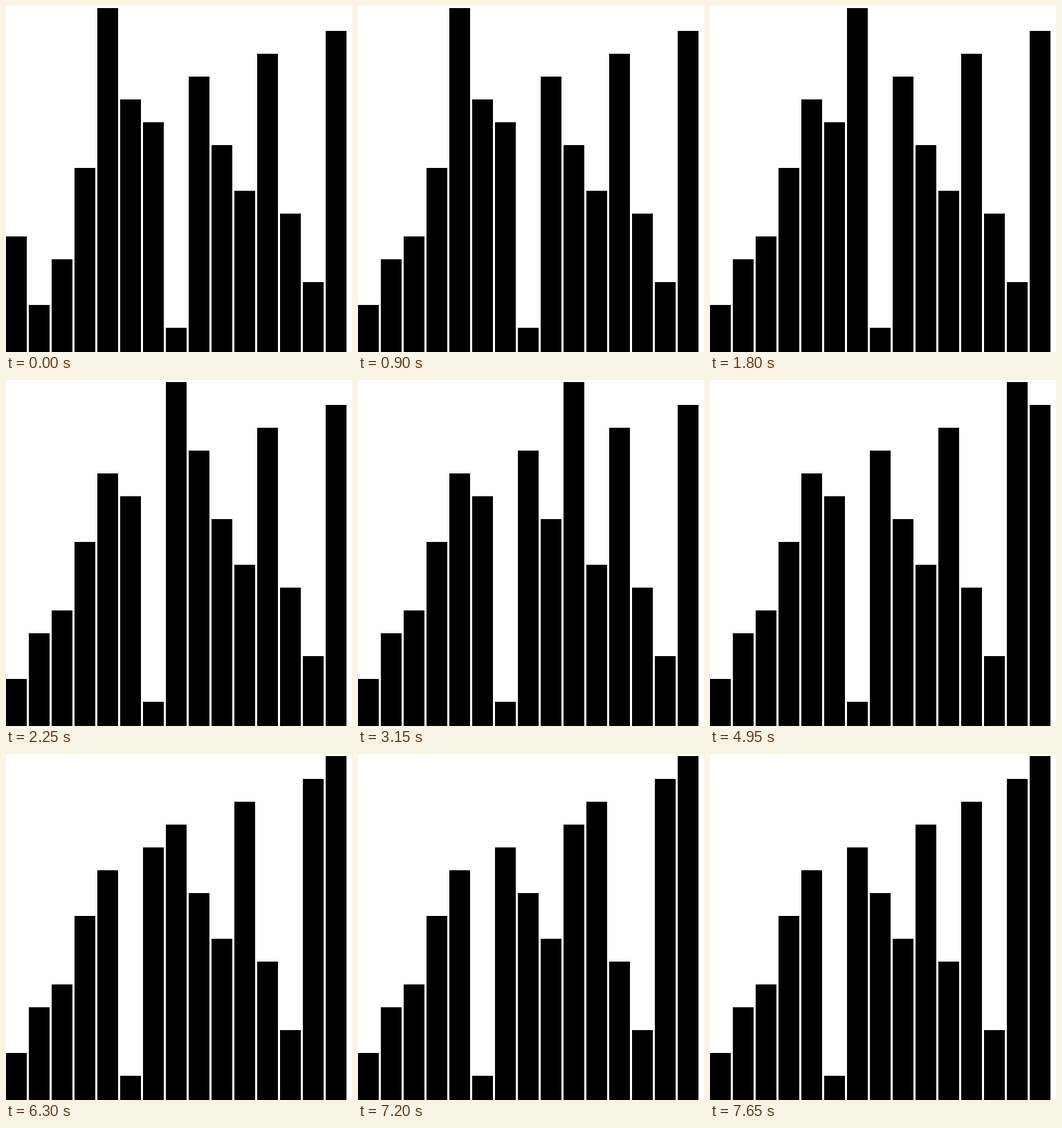
Write an HTML page with a canvas that moves like this. It is 500 by 500 pixels and loops after 8000 ms.

```html
<!DOCTYPE html>
<html lang="en">
<head>
<meta charset="utf-8">
<title>Bubble sort</title>
<style>
  html, body { margin: 0; width: 100%; height: 100%; overflow: hidden; background: #fff; }
  canvas { display: block; width: 500px; height: 500px; }
</style>
</head>
<body>
<canvas id="stage" width="500" height="500"></canvas>
<script>
const SIZE = 500, PITCH = 33, BAR = 30;
const STEP = 450, LOOP = 8000;
const START = [5, 2, 4, 8, 15, 11, 10, 1, 12, 9, 7, 13, 6, 3, 14];

const ctx = document.getElementById('stage').getContext('2d');

// One state of the list per swap, limited to what fits in the loop.
function bubbleStates(start, count) {
  const list = [...start];
  const states = [[...list]];
  for (let end = list.length - 1; end > 0; end--) {
    for (let i = 0; i < end; i++) {
      if (list[i] <= list[i + 1]) continue;
      [list[i], list[i + 1]] = [list[i + 1], list[i]];
      states.push([...list]);
      if (states.length === count) return states;
    }
  }
  return states;
}

const states = bubbleStates(START, Math.ceil(LOOP / STEP));

function draw(list) {
  ctx.fillStyle = '#fff';
  ctx.fillRect(0, 0, SIZE, SIZE);
  ctx.fillStyle = '#000';
  list.forEach((value, i) => {
    const top = 498 - PITCH * value;
    ctx.fillRect(i * PITCH, top, BAR, SIZE - top);
  });
}

const begin = performance.now();

function frame() {
  const time = (performance.now() - begin) % LOOP;
  draw(states[Math.floor(time / STEP)]);
  requestAnimationFrame(frame);
}

frame();
</script>
</body>
</html>
```
